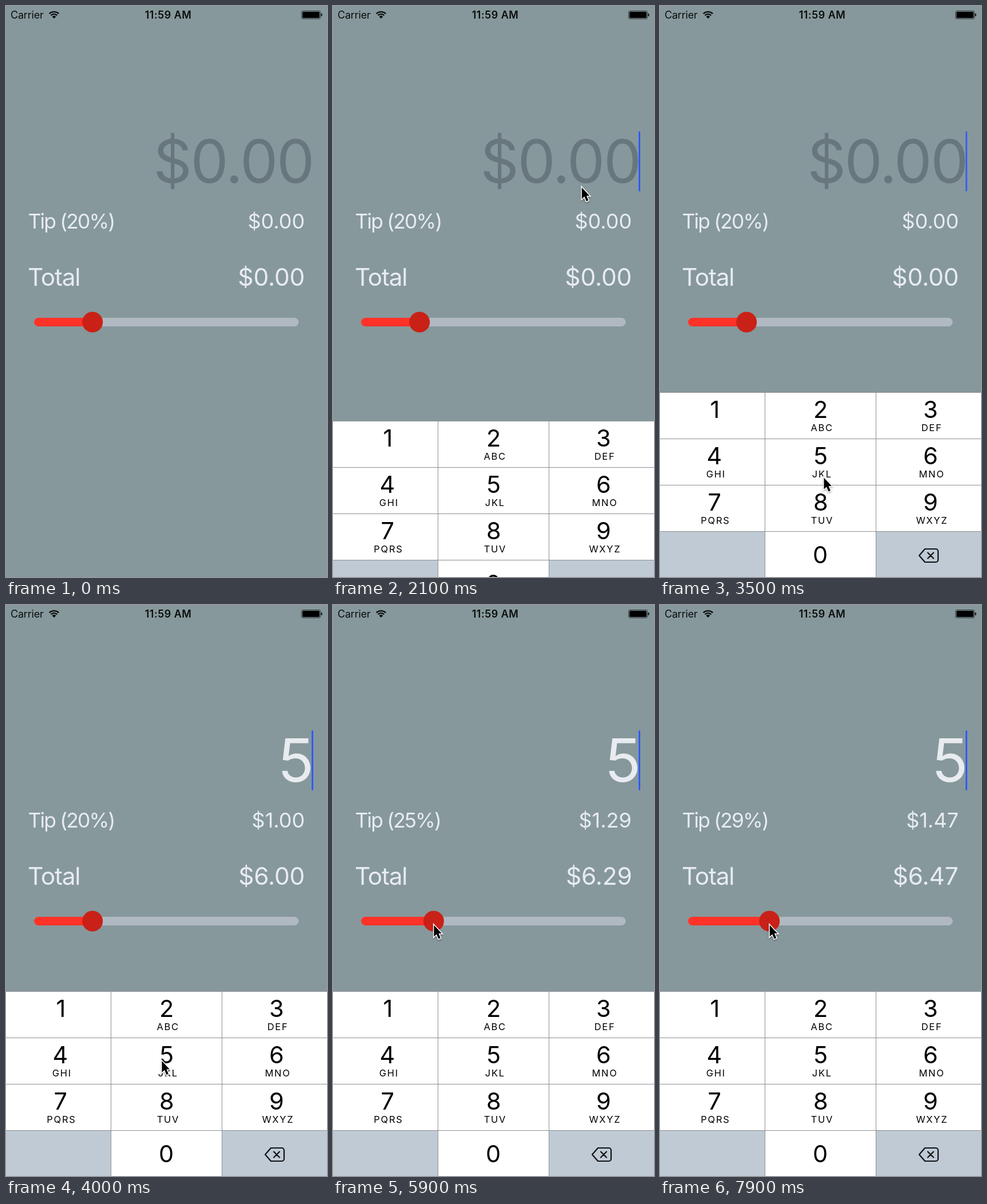
These frames come from a looping animation (561 px wide and 998 px high, 8000 ms). An HTML page with a canvas:

```html
<!DOCTYPE html>
<html lang="en">
<head>
<meta charset="utf-8">
<title>Tip calculator</title>
<style>
html, body { margin: 0; width: 100%; height: 100%; overflow: hidden; background: #86989b; }
canvas { display: block; width: 561px; height: 998px; }
</style>
</head>
<body>
<canvas id="stage"></canvas>
<script>
const W = 561, H = 998, LOOP = 8000, STEP = 100;
const ENTER = 100, FOCUS = 1900, PRESS = 3600, TYPED = 3800, GRAB = 4800;
const COLORS = {
  bg: '#86989b', ink: '#0b0d0d', hint: '#68767e', text: '#e8ecf1', track: '#b0b9c1',
  fill: '#ff3228', thumb: '#c92117', caret: '#305cff', key: '#fff', side: '#bfcad5', line: '#8d8f91'
};
const KEYS = ['', 'ABC', 'DEF', 'GHI', 'JKL', 'MNO', 'PQRS', 'TUV', 'WXYZ'];

// Eased moves: start time, end time, target
const POINTER = [
  { from: 1100, to: 1300, at: [421, 275] },
  { from: 1400, to: 1600, at: [445, 269] },
  { from: 1980, to: 2700, at: [288, 872] },
  { from: 2800, to: 3400, at: [285, 821] },
  { from: 3800, to: 4800, at: [150, 556] }
];
const DRAG = [
  { from: 5100, to: 5400, at: [0] },
  { from: 5500, to: 5900, at: [25.8] },
  { from: 6000, to: 6400, at: [0] },
  { from: 6500, to: 6900, at: [29.4] }
];

const canvas = document.getElementById('stage');
const ctx = canvas.getContext('2d');
const ratio = window.devicePixelRatio || 1;
canvas.width = W * ratio;
canvas.height = H * ratio;

const clamp = v => Math.min(1, Math.max(0, v));
const mix = (a, b, u) => a + (b - a) * u;

function glide(origin, moves, t) {
  return moves.reduce((pos, m) => {
    const u = clamp((t - m.from) / (m.to - m.from));
    return pos.map((v, i) => mix(v, m.at[i], u * u * (3 - 2 * u)));
  }, origin);
}

// Places text by the edges of its ink: align 0 = left, 0.5 = centre, 1 = right
function text(str, x, y, size, color, align = 0, spacing = 0, weight = 400) {
  ctx.font = `${weight} ${size}px Inter, Roboto, sans-serif`;
  ctx.letterSpacing = spacing + 'px';
  ctx.fillStyle = color;
  const m = ctx.measureText(str);
  const left = m.actualBoundingBoxLeft, right = m.actualBoundingBoxRight;
  ctx.fillText(str, x + left - (left + right) * align, y);
}

function rect(x, y, w, h, color) {
  ctx.fillStyle = color;
  ctx.fillRect(x, y, w, h);
}

function pill(x, y, w, h, r, color) {
  ctx.fillStyle = color;
  ctx.beginPath();
  ctx.roundRect(x, y, w, h, r);
  ctx.fill();
}

function poly(points) {
  ctx.beginPath();
  points.forEach(p => ctx.lineTo(...p));
  ctx.closePath();
}

function statusBar() {
  const ink = COLORS.ink;
  text('Carrier', 9, 22, 18, ink, 0, -0.2);
  text('11:59 AM', 283, 22, 18, ink, 0.5, 0.5, 600);

  ctx.strokeStyle = ink;
  ctx.lineWidth = 2.3;
  const from = -Math.PI * 0.75, to = -Math.PI * 0.25;
  for (const r of [11.7, 7.7]) {
    ctx.beginPath();
    ctx.arc(84, 21.8, r, from, to);
    ctx.stroke();
  }
  ctx.fillStyle = ink;
  ctx.beginPath();
  ctx.moveTo(84, 22);
  ctx.arc(84, 21.8, 4.8, from, to);
  ctx.fill();

  ctx.strokeStyle = '#2f3637';
  ctx.lineWidth = 1;
  ctx.beginPath();
  ctx.roundRect(516.5, 8.5, 33, 14, 2.5);
  ctx.stroke();
  pill(518, 10, 30, 11, 1.5, '#000');
  pill(550.5, 13, 2, 5, 1, ink);
}

function caretAlpha(t) {
  if (t < FOCUS) return 0;
  const first = t < TYPED ? 2000 : 4030;
  const phase = Math.max(0, t - first) % 900;
  return clamp((690 - phase) / 100);
}

function amounts(t, percent) {
  const bill = t < TYPED ? 0 : 5;
  const tip = bill * percent / 100;
  const money = v => '$' + v.toFixed(2);
  if (bill) text('5', 533, 309, 105, COLORS.text, 1);
  else text('$0.00', 533, 309, 105, COLORS.hint, 1, -2.3);

  ctx.globalAlpha = caretAlpha(t);
  pill(534, 219, 3, 105, 1.5, COLORS.caret);
  ctx.globalAlpha = 1;

  text(`Tip (${Math.floor(percent)}%)`, 39.5, 389, 35.5, COLORS.text, 0, -1.9);
  text(money(tip), 520.5, 389, 36, COLORS.text, 1);
  text('Total', 40, 489, 42.5, COLORS.text, 0, -1.3);
  text(money(bill + tip), 520.5, 489, 42.5, COLORS.text, 1, -0.2);
}

function slider(x) {
  pill(49, 545, 462.5, 15, 7.5, COLORS.track);
  pill(49, 545, x - 49, 15, 7.5, COLORS.fill);
  ctx.fillStyle = COLORS.thumb;
  ctx.beginPath();
  ctx.arc(x, 552.5, 18, 0, Math.PI * 2);
  ctx.fill();
}

function backspace(x, y) {
  ctx.save();
  ctx.translate(x, y);
  ctx.strokeStyle = '#111';
  ctx.lineWidth = 2.2;
  ctx.lineJoin = ctx.lineCap = 'round';
  ctx.beginPath();
  ctx.moveTo(-7, 11.5);
  ctx.lineTo(-10, 11.5);
  ctx.lineTo(-20, 0);
  ctx.lineTo(-10, -11.5);
  ctx.arcTo(13, -11.5, 13, 0, 4);
  ctx.arcTo(13, 11.5, -7, 11.5, 4);
  ctx.closePath();
  for (const s of [-1, 1]) {
    ctx.moveTo(-5, -5 * s);
    ctx.lineTo(5, 5 * s);
  }
  ctx.stroke();
  ctx.restore();
}

function keyboard(t) {
  if (t <= FOCUS) return;
  // critically damped slide
  const k = Math.max(0, t - 1930) * 0.0196;
  const drop = 323 * (1 + k) * Math.exp(-k);
  ctx.save();
  ctx.translate(0, 675 + Math.round(drop));
  rect(0, 0, W, 323, COLORS.key);
  for (const x of [0, 378]) rect(x, 243, 183, 80, COLORS.side);
  if (t >= PRESS && t < TYPED) rect(184, 82, 193, 80, COLORS.side);
  for (let row = 0; row < 4; row++) rect(0, row * 81, W, 1, COLORS.line);
  for (const x of [183, 377]) rect(x, 0, 1, 323, COLORS.line);

  KEYS.forEach((letters, i) => {
    const x = 95 + i % 3 * 189 - i % 3 * 3, y = Math.floor(i / 3) * 81;
    const center = i % 3 === 2 ? x + 6 : x;
    text(String(i + 1), center, y + 45, 41.5, '#000', 0.5);
    if (letters) text(letters, center + 1.3, y + 68, 16.5, '#000', 0.5, 1.7);
  });
  text('0', 280, 299, 41.5, '#000', 0.5);
  backspace(473, 285.5);
  ctx.restore();
}

function arrow(x, y) {
  ctx.save();
  ctx.translate(x, y);
  poly([[1.5, 3.5], [1.5, 23.5], [6, 19.4], [9.5, 27.6], [13, 26], [9.6, 18], [15, 18]]);
  ctx.lineWidth = 3;
  ctx.strokeStyle = '#fff';
  ctx.shadowColor = 'rgba(0,0,0,0.35)';
  ctx.shadowBlur = 3 * ratio;
  ctx.shadowOffsetY = 1.5 * ratio;
  ctx.stroke();
  ctx.shadowColor = 'transparent';
  ctx.fillStyle = '#000';
  ctx.fill();
  ctx.restore();
}

// Sweeps in from the top, then glides between the controls
function pointer(t) {
  const u = clamp((t - ENTER) / 800);
  const sweep = [
    mix(300, 150, u) + 165 * Math.sin(2 * Math.PI * u),
    mix(9, 542, u) + 430 * Math.sin(Math.PI * u) ** 2
  ];
  return glide(sweep, POINTER, t);
}

function draw(t) {
  ctx.setTransform(ratio, 0, 0, ratio, 0, 0);
  rect(0, 0, W, H, COLORS.bg);
  const [percent] = glide([20], DRAG, t);
  const thumb = 66 + 4.26 * percent;
  statusBar();
  amounts(t, percent);
  slider(thumb);
  keyboard(t);
  if (t > GRAB) arrow(thumb - 1, 556);
  else if (t >= ENTER) arrow(...pointer(t));
}

const start = performance.now();
function tick() {
  const t = (performance.now() - start) % LOOP;
  draw(Math.floor(t / STEP) * STEP);
  requestAnimationFrame(tick);
}
tick();
</script>
</body>
</html>
```
